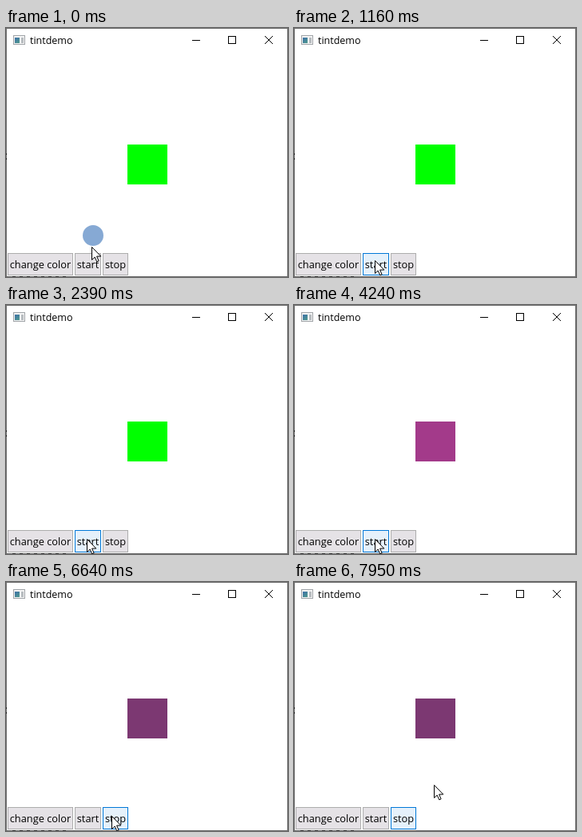
An HTML page with a canvas for the animation above (7.99 s loop, 353x312 px).

```html
<!DOCTYPE html>
<html>
<head>
<meta charset="utf-8">
<style>
html, body { margin: 0; width: 100%; height: 100%; overflow: hidden; background: #fff; }
canvas { display: block; }
</style>
</head>
<body>
<canvas id="stage" width="353" height="312"></canvas>
<script>
const ctx = document.getElementById('stage').getContext('2d');
const LOOP = 7990;

// [time, x, y] of the pointer tip, linear in between
const pointerPath = [
  [0, 108, 274], [200, 108, 274], [450, 104, 282], [590, 103, 284], [620, 103, 284],
  [1350, 102, 293], [6240, 102, 293], [6700, 137, 293], [7870, 137, 293],
  [7870, 149, 281], [7950, 176, 254], [LOOP, 176, 254]
];
// [time, value], held until the next entry
const squareColor = [[0, '#00ff00'], [3240, '#7d7a68'], [4240, '#a33a8a'], [5240, '#806f84'], [6240, '#7c3872']];
const startState = [[0, 'idle'], [620, 'hover'], [2070, 'pressed'], [2240, 'hover'], [6490, 'idle']];
const stopState = [[0, 'idle'], [6520, 'hover'], [6750, 'pressed'], [6840, 'hover']];
const looks = {
  idle: ['#e5e2e6', '#adadad'],
  hover: ['#e5f1fb', '#0078d7'],
  pressed: ['#cce4f7', '#005499']
};
// click ripples: centre and start times of the four phases, then the end
const ripples = [
  { x: 109, y: 260, times: [0, 200, 300, 450, 620] },
  { x: 103, y: 293, times: [2240, 2270, 2310, 2350, 2390] },
  { x: 136, y: 292, times: [6840, 6870, 6900, 6950, 6990] }
];
const phases = [[13, 0], [24, 0], [30, 10], [30, 22]]; // outer, inner radius

const held = (steps, t) => steps.filter(s => s[0] <= t).pop()[1];

function fill(color, x, y, w, h) {
  ctx.fillStyle = color;
  ctx.fillRect(x, y, w, h);
}

function outline(color, x, y, w, h) {
  ctx.strokeStyle = color;
  ctx.strokeRect(x + .5, y + .5, w - 1, h - 1);
}

function text(label, x, y, font, align) {
  ctx.font = font + ' "Open Sans", sans-serif';
  ctx.textAlign = align;
  ctx.fillStyle = '#000';
  ctx.fillText(label, x, y);
}

function button(label, x, w, state) {
  const [face, edge] = looks[state];
  fill(face, x, 282, w, 28);
  outline(edge, x, 282, w, 28);
  text(label, x + w / 2, 301, '500 12.8px', 'center');
}

function drawWindow() {
  fill('#fff', 0, 0, 353, 312);
  outline('#6e6e6e', 0, 0, 353, 312);
  fill('#222', 0, 157, 1, 2);
  fill('#222', 0, 163, 1, 2);
  for (let x = 8; x < 72; x += 9) fill('#222', x, 311, 4, 1);

  // icon
  fill('#f4f4f4', 9, 9, 15, 12);
  outline('#a0a4a8', 9, 9, 15, 12);
  const tint = ctx.createLinearGradient(11, 12, 17, 19);
  tint.addColorStop(0, '#3d6fa8');
  tint.addColorStop(1, '#4f9a8c');
  fill(tint, 11, 12, 6, 7);
  fill('#b8bcc0', 19, 12, 3, 7);

  text('tintdemo', 30, 20, '12.5px', 'left');

  // minimise, maximise, close
  fill('#000', 233, 15, 10, 1);
  outline('#000', 278, 10, 10, 10);
  ctx.beginPath();
  ctx.moveTo(324, 10); ctx.lineTo(334, 20);
  ctx.moveTo(334, 10); ctx.lineTo(324, 20);
  ctx.stroke();
}

function drawRipple({ x, y, times }, t) {
  const phase = times.findLastIndex(start => start <= t);
  if (phase < 0 || phase >= phases.length) return;
  const [outer, inner] = phases[phase];
  ctx.beginPath();
  ctx.arc(x, y, outer, 0, 7);
  ctx.arc(x, y, inner, 0, 7, true);
  ctx.fillStyle = phase ? 'rgba(64,105,242,.6)' : 'rgba(54,112,184,.6)';
  ctx.fill('evenodd');
}

function drawPointer(t) {
  const i = pointerPath.findLastIndex(p => p[0] <= t);
  const [t0, x0, y0] = pointerPath[i], [t1, x1, y1] = pointerPath[i + 1];
  const k = (t - t0) / (t1 - t0);
  ctx.save();
  ctx.translate(Math.round(x0 + (x1 - x0) * k) - .5, Math.round(y0 + (y1 - y0) * k) + .5);
  const arrow = new Path2D('M0 0V16L3.7 12.6L6.3 18.4L8.6 17.4L6.1 11.6H11.3Z');
  ctx.fillStyle = '#fff';
  ctx.fill(arrow);
  ctx.strokeStyle = '#000';
  ctx.stroke(arrow);
  ctx.restore();
}

function frame() {
  const t = performance.now() % LOOP;
  drawWindow();
  fill(held(squareColor, t), 152, 146, 50, 50);
  button('change color', 2, 82, 'idle');
  button('start', 86, 33, held(startState, t));
  button('stop', 121, 32, held(stopState, t));
  ripples.forEach(r => drawRipple(r, t));
  drawPointer(t);
  requestAnimationFrame(frame);
}
frame();
</script>
</body>
</html>
```
